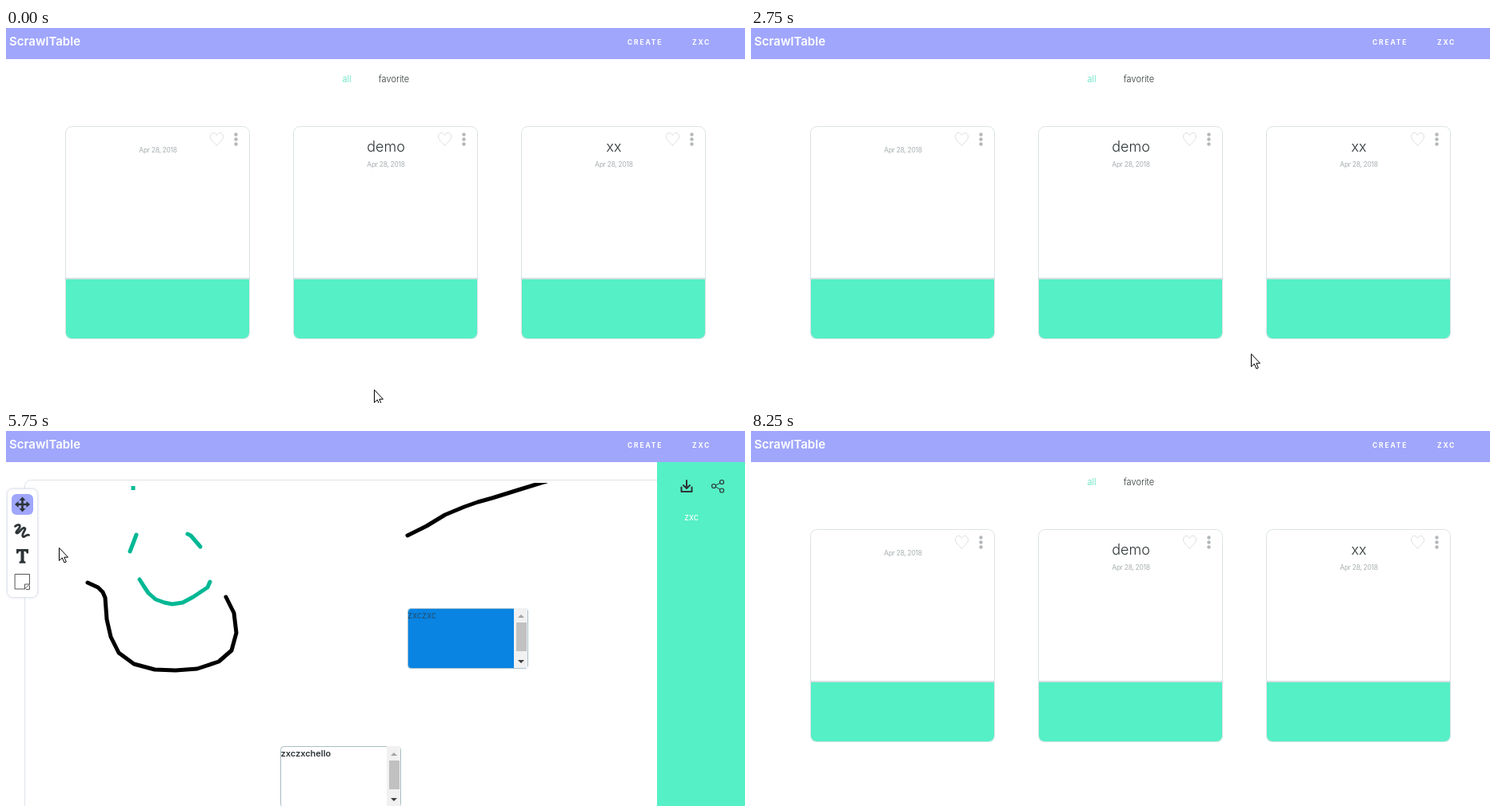
An HTML page for the animation above (9250 ms loop, 924x470 px).

```html
<!DOCTYPE html>
<html lang="en">
<head>
<meta charset="utf-8">
<title>Sketch dashboard</title>
<style>
  html, body { margin: 0; width: 100%; height: 100%; overflow: hidden; background: #fff; }
  svg { display: block; width: 924px; height: 470px; font-family: Inter, "Open Sans", sans-serif; fill: #2d3436; }
  .line { fill: none; stroke-linecap: round; stroke-linejoin: round; }
  .nav { fill: #fff; font-weight: 700; font-size: 8.5px; letter-spacing: 1.8px; }
  .mid { text-anchor: middle; }
  .date { font-size: 8.6px; letter-spacing: -.35px; fill: #a9b0b3; }
</style>
</head>
<body>
<svg viewBox="0 0 924 470">
  <defs>
    <clipPath id="page"><rect x="24" y="65" width="790" height="405"/></clipPath>
    <filter id="soft" x="-30%" y="-10%" width="160%" height="120%">
      <feDropShadow dx="0" dy="0" stdDeviation="1.5" flood-color="#8a94b8" flood-opacity=".35"/>
    </filter>
    <g id="scroll">
      <rect width="17" height="75" fill="#f1f1f1"/>
      <rect x="3" y="18" width="13" height="36" fill="#c1c1c1"/>
      <path d="M5 12l4-4 4 4z" fill="#a3a3a3"/>
      <path d="M5 65l4 4 4-4z" fill="#404040"/>
    </g>
  </defs>

  <g id="home">
    <g font-size="11" font-weight="300">
      <text x="420.5" y="68" fill="#55e0ba">all</text>
      <text x="466" y="68">favorite</text>
    </g>
    <g id="cards"></g>
  </g>

  <g id="board">
    <path class="line" d="M23.500 470V70q0-8.500 8.500-8.500H814" stroke="#dfe3ea"/>
    <g clip-path="url(#page)" class="line" stroke-width="5">
      <g stroke="#000">
        <path d="M502 131L526 119 549 105 573 95 590 89 608 84 640 74 669 65 676 63"/>
        <path d="M102 190L115 196 121 202 124 209 126 236 131 258 141 278 160 292 186 299 212 300 239 298 266 289 282 275 288 253 285 228 275 208"/>
      </g>
      <g stroke="#00b894">
        <path d="M156.500 71.500h5" stroke-linecap="butt"/>
        <path d="M163 130L155 151M227 129L231 131 237 138 243 145"/>
        <path d="M167 186L172 194 178 203 187 211 198 215 208 217 221 215 234 208 246 200 252 196 255 189"/>
      </g>
    </g>

    <rect x="502.500" y="222.500" width="150" height="75" rx="4" fill="#0984e3" stroke="#a9c2cc"/>
    <use href="#scroll" x="635" y="222"/>
    <text x="502" y="235" font-size="11" opacity=".65">zxczxc</text>
    <rect x="343.500" y="395.500" width="150" height="76" rx="4" fill="#fff" stroke="#a9bcc0"/>
    <use href="#scroll" x="476" y="395"/>
    <text x="343.500" y="408" font-size="11" font-weight="600">zxczxchello</text>

    <rect x="1.500" y="72.500" width="38" height="136" rx="7" fill="#fff" stroke="#e3e6f2" filter="url(#soft)"/>
    <rect x="7" y="79" width="27" height="26" rx="6" fill="#a0a6fb"/>
    <path d="M20.500 82.500l4 4.500h-2.700v3.700h3.700V88l4.500 4-4.500 4v-2.700h-3.700V97h2.700l-4 4.500-4-4.500h2.700v-3.700h-3.700V96L11 92l4.500-4v2.700h3.700V87h-2.700z"/>
    <path class="line" d="M11.500 119.500c3-3 7-2.500 5.500 1.200-1.500 3.500-6 6.300-3.500 7.300 3 1 6-7.500 9.500-6.500 3.500 1-4 7.500-2 10.500 1.700 2.500 5-3.500 7.500-1.500" stroke="#2d3436" stroke-width="2.800"/>
    <path d="M13 148h15v5.500h-2.200q-.3-2.700-2.300-2.700h-1V162q0 1.700 2 1.700v2h-8v-2q2 0 2-1.700v-11.200h-1q-2 0-2.300 2.700H13z"/>
    <path class="line" d="M11.500 179.500h18v12.500l-6 6h-12zM23.500 198v-6h6M29.500 194v4.500h-4" stroke="#555" stroke-width="1"/>

    <rect x="814" y="39" width="110" height="431" fill="#55f0c5"/>
    <path class="line" d="M851 62v9M847 68l4 4 4-4M844.500 70.500V76h13v-5.500" stroke="#2d3436" stroke-width="2"/>
    <path class="line" d="M894 64.500L886 69l8 5" stroke="#2d3436"/>
    <g fill="#55f0c5" stroke="#2d3436" stroke-width="1.200">
      <circle cx="885" cy="69" r="2.500"/><circle cx="895" cy="64" r="2.500"/><circle cx="895" cy="74.500" r="2.500"/>
    </g>
    <text class="mid" x="857" y="112" font-size="11" fill="#fff">zxc</text>
  </g>

  <rect width="924" height="39" fill="#a0a6fb"/>
  <text x="4" y="22" font-size="15" font-weight="600" fill="#fff">ScrawlTable</text>
  <text class="nav" x="777" y="21">CREATE</text>
  <text class="nav" x="858" y="21">ZXC</text>

  <g id="pointer" fill="#fff" stroke="#000">
    <path id="arrow" d="M.5.5V16.500L4.300 13 7 19 9.300 18 6.800 12.200H11.500Z"/>
    <g id="hand" transform="translate(-6)" stroke-linejoin="round">
      <path d="M5.500 14.500V2.300Q5.500.7 7 .7T8.500 2.300V8Q10 6.800 11.500 8.300 13 7.300 14.500 9 17.800 8.800 17.800 11.500V16Q17.800 18.500 16 20.500V23.300H7V20.500Q4 17 1.200 13.500.5 11.500 2.500 11.500 4 12 5.500 14.500Z" stroke-width="1.200"/>
      <path d="M8.500 8v4M11.500 8.500V12M14.500 9.500V12" fill="none"/>
    </g>
  </g>
</svg>
<script>
  const $ = id => document.getElementById(id);
  const LOOP = 9250, STEP = 250;
  const GREEN = '#55f0c5', PURPLE = '#a0a6fb';
  const cardX = [74.5, 359.5, 644.5];

  // Pointer path: time in ms, x, y
  const path = [
    [0, 460, 453], [250, 462, 430], [500, 466, 382], [750, 468, 342], [1250, 470, 332],
    [1750, 480, 340], [2250, 545, 374], [2500, 592, 398], [2750, 625, 408],
    [3000, 650, 396], [3250, 690, 366], [3500, 735, 336], [3750, 757, 327], [4750, 757, 327],
    [5000, 620, 285], [5500, 150, 165], [5750, 66, 146],
    [6250, 74, 80], [6500, 81, 28], [6750, 82, 22], [7000, 82, 22],
    [7250, 150, 75], [7500, 330, 260], [7750, 520, 420], [8000, 770, 428], [8250, 940, 428], [LOOP, 940, 428]
  ];

  function drawCard(x, i) {
    const title = ['', 'demo', 'xx'][i];
    const dots = [9.5, 15.5, 21.5].map(y => `<circle cx="213" cy="${y + .5}" r="2.2"/>`).join('');
    return `<g transform="translate(${x} 123.500)">
      <path class="foot" d="M0 191H230V258q0 8-8 8H8q-8 0-8-8z"/>
      <rect width="230" height="266" rx="8" fill="none" stroke="#dce3e5"/>
      <path d="M0 190.500H230" stroke="#d5dfe1" stroke-width="2"/>
      <path class="line" d="M189 23.500C184 19 181 16 181 12.500c0-5.500 6.500-6 8-1.500 1.500-4.500 8-4 8 1.500 0 3.500-3 6.500-8 11z" stroke="#dddfe1"/>
      <g fill="#b5b8ba">${dots}</g>
      <text class="mid" x="115.500" y="31" font-size="18" font-weight="300">${title}</text>
      <text class="mid date" x="115.500" y="${title ? 50 : 32}">Apr 28, 2018</text>
      <text class="mid hint" x="115.500" y="210" font-size="11" fill="#fff">Start ScrawlTable :-)</text>
    </g>`;
  }
  $('cards').innerHTML = cardX.map(drawCard).join('');
  const feet = document.querySelectorAll('.foot'), hints = document.querySelectorAll('.hint');

  function pointerAt(t) {
    const k = Math.max(1, path.findIndex(p => p[0] >= t));
    const [t0, x0, y0] = path[k - 1], [t1, x1, y1] = path[k];
    const u = (t - t0) / (t1 - t0);
    return [x0 + (x1 - x0) * u, y0 + (y1 - y0) * u];
  }

  const hoverAt = ([x, y]) => cardX.findIndex(c => x > c && x < c + 230 && y > 314 && y < 389);
  const show = (el, on) => { el.style.display = on ? '' : 'none'; };

  function render(now) {
    const t = Math.floor(now % LOOP / STEP) * STEP;
    const onBoard = t >= 4750 && t < 7000;
    const pos = pointerAt(t), [x, y] = pos;
    const hover = hoverAt(pos), before = hoverAt(pointerAt(Math.max(0, t - 500)));
    const onBrand = x < 96 && y < 30;
    const isHand = onBrand || (!onBoard && hover >= 0);

    show($('home'), !onBoard);
    show($('board'), onBoard);
    feet.forEach((foot, i) => {
      foot.setAttribute('fill', i === hover ? PURPLE : GREEN);
      show(hints[i], i === hover && i === before);
    });
    show($('hand'), isHand);
    show($('arrow'), !isHand);
    $('pointer').setAttribute('transform', `translate(${Math.round(x)} ${Math.round(y)})`);
  }

  const start = performance.now();
  function tick() {
    render(performance.now() - start);
    requestAnimationFrame(tick);
  }
  tick();
</script>
</body>
</html>
```
